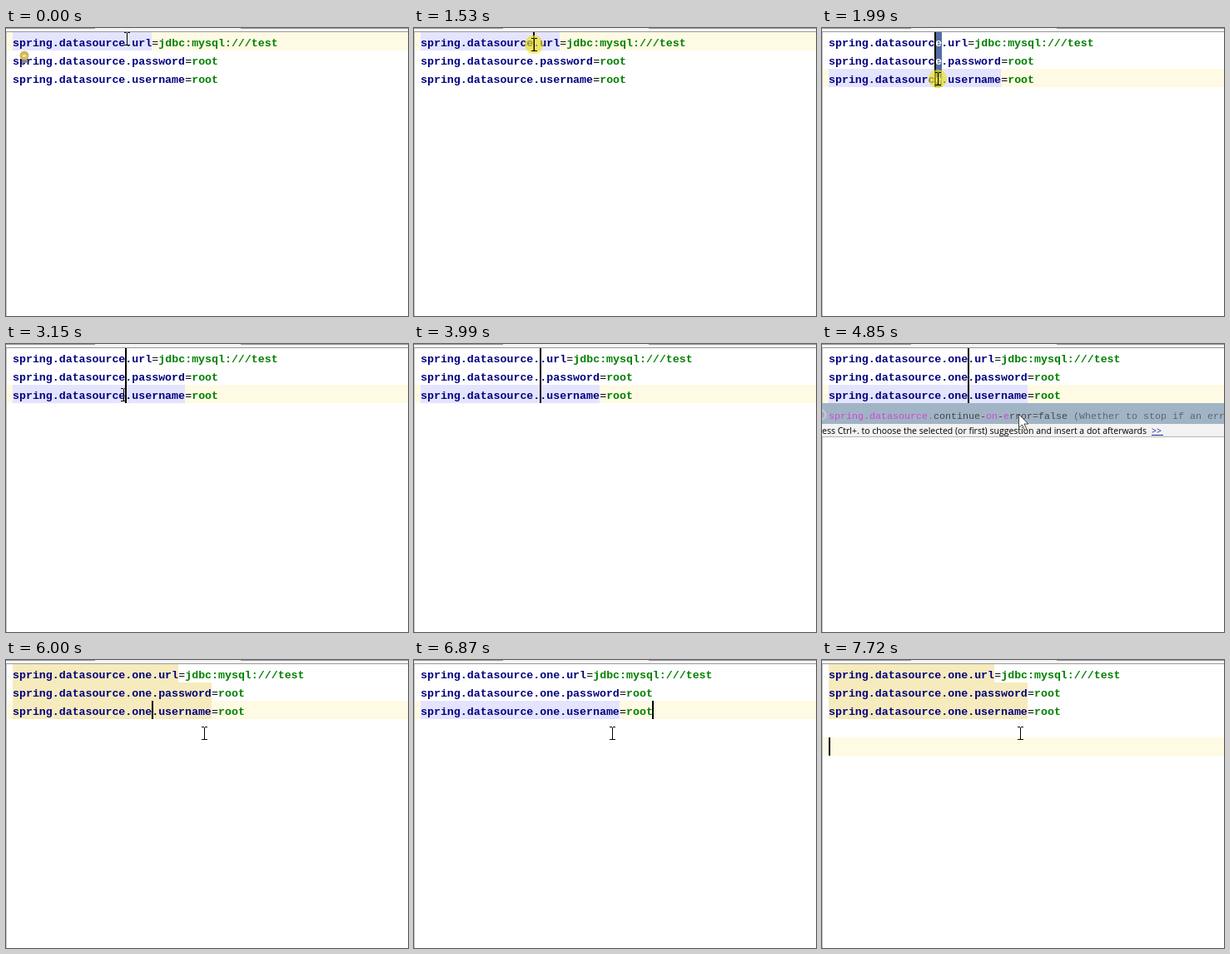
Write an HTML page with a canvas that moves like this. It is 483 px wide and 346 px high and loops after 8 s.

```html
<!DOCTYPE html>
<html>
<head>
<meta charset="utf-8">
<style>
html, body { margin: 0; width: 100%; height: 100%; overflow: hidden; background: #fff; }
canvas { display: block; }
</style>
</head>
<body>
<canvas id="stage" width="483" height="346"></canvas>
<script>
const ctx = document.getElementById('stage').getContext('2d');
const LOOP = 8000, W = 483, LEFT = 8, CELL = 7.97, LINE = 22, TOP = 5, POPUP_TOP = 71, ROW = 24;
const PLAIN_FONT = '13.28px "Liberation Mono", monospace';
const EDITOR_FONT = 'bold ' + PLAIN_FONT;
const POPUP_FONT = '11.667px "Liberation Mono", monospace';
const PREFIX = 'spring.datasource.';
const PROPERTIES = [['url', 'jdbc:mysql:///test'], ['password', 'root'], ['username', 'root']];
const SUGGESTIONS = [
  ['username', 'Login username of the database'],
  ['password', 'Login password of the database'],
  ['url', 'JDBC URL of the database'],
  ['driver-class-name', 'Fully qualified name of the JDBC driver'],
  ['type', 'Fully qualified name of the connection pool implementation'],
  ['schema', 'Schema (DDL) script resource references'],
  ['continue-on-error=false', 'Whether to stop if an error occurs'],
  ['data', 'Data (DML) script resource references'],
  ['data-password', 'Password of the database to execute DML scripts'],
  ['data-username', 'Username of the database to execute DML scripts'],
  ['generate-unique-name=false', 'Whether to generate a random name'],
  ['initialization-mode=embedded', 'Initialize the datasource'],
  ['platform=all', 'Platform to use in the scripts'],
  ['schema-password', 'Password of the database to execute DDL scripts'],
  ['separator=;', 'Statement separator in scripts'],
  ['hikari.connection-timeout', 'Connection timeout'],
  ['hikari.connection-test-query', 'Query used to test a connection'],
  ['tomcat.connection-properties', 'Properties of the connection'],
  ['dbcp2.connection-init-sqls', 'Statements run on connection'],
  ['xa.data-source-class-name', 'XA datasource fully qualified name']
];

const within = (t, a, b) => t >= a && t < b;
const clamp01 = v => Math.max(0, Math.min(1, v));
const columnX = col => LEFT + col * CELL;
const lineY = line => TOP + line * LINE;

function rect(x, y, w, h, color) {
  ctx.fillStyle = color;
  ctx.fillRect(x, y, w, h);
}

function disc(x, y, r, color) {
  ctx.fillStyle = color;
  ctx.beginPath();
  ctx.arc(x, y, r, 0, 7);
  ctx.fill();
}

function text(str, x, y, color) {
  ctx.fillStyle = color;
  ctx.fillText(str, x, y);
}

// Drag progress advances in seven hard steps.
const dragAt = t => t < 1530 ? 0 : clamp01((Math.floor((t - 1530) / 76.6) + 1) / 7);

function stateAt(t) {
  const drag = dragAt(t);
  const typed = t < 3920 ? '' : t < 4620 ? '.' : t < 4770 ? 'o.' : t < 4850 ? 'on.' : 'one.';
  const s = { typed, current: 0, first: 0, col: 17 + typed.length, select: 0, pressed: within(t, 1220, 3150) };
  s.mouse = { x: 145, y: 13, kind: 'beam' };

  if (t < 2690) {
    s.mouse.x = 145 - 6 * drag;
    s.mouse.y = 13 + 48 * drag;
    s.current = Math.min(2, Math.floor((s.mouse.y - TOP) / LINE));
    if (s.mouse.x < 140.5) { s.col = 16; s.select = 1; }
    s.caret = !(t < 210 || within(t, 760, 1220));
    return s;
  }

  s.current = 2;
  Object.assign(s.mouse, t < 2920 ? { x: 140, y: 61 } : t < 3300 ? { x: 141, y: 61 }
    : t < 3380 ? { x: 198, y: 77 } : { x: 238, y: 88 });
  if (within(t, 3920, 4460)) s.mouse.kind = 'none';
  if (within(t, 4460, 6000)) s.mouse.kind = 'arrow';
  s.caret = !(within(t, 3690, 3920) || within(t, 5690, 6000) || within(t, 6700, 6870));
  if (t >= 6000) s.first = 2;
  if (t >= 6870) s.col = 35;
  if (t >= 7490) {
    s.current = s.first = t < 7720 ? 3 : 4;
    s.col = 0;
  }
  return s;
}

function drawEditor(t, s) {
  rect(0, 0, W, 346, '#fff');
  rect(0, 0, W, 4, '#f4f4f4');
  rect(0, 0, 107, 1, '#999');
  rect(282, 0, W - 282, 1, '#999');
  rect(0, 4, W, 1, '#999');
  rect(0, TOP, 1, 341, '#c4c4c4');
  rect(1, lineY(s.current), W - 1, LINE, '#fffae3');

  PROPERTIES.forEach(([name, value], i) => {
    const key = PREFIX + s.typed + name;
    const y = lineY(i), keyWidth = Math.round(key.length * CELL);
    const warned = within(t, 6000, 6870) || t >= (i === 2 ? 7260 : 7170);
    if (warned) rect(LEFT, y, keyWidth, LINE, '#f6ebbc');
    else if (i === s.current) rect(LEFT, y, keyWidth, LINE, '#e4e4ff');
    ctx.font = PLAIN_FONT;
    text('=', columnX(key.length), y + 17, '#000');
    ctx.font = EDITOR_FONT;
    text(key, LEFT, y + 17, '#000080');
    text(value, columnX(key.length + 1), y + 17, '#008000');
    if (s.select && i <= s.current) {
      const x = Math.round(columnX(s.col));
      rect(x, y, 8 * s.select, LINE, '#526da5');
      text(key.substr(s.col, s.select), x, y + 17, '#fff');
    }
  });

  if (s.caret) {
    for (let i = s.first; i <= s.current; i++) {
      rect(Math.floor(columnX(s.col)), lineY(i), 2, LINE, '#000');
    }
  }
  if (t < 1220) {
    disc(22, 33, 5.5, '#d3b85c');
    rect(19, 38, 6, 4, '#8f8a78');
    rect(20, 32, 4, 3, '#f3e3a0');
  }
}

function matchedCells(name, query) {
  const at = name.indexOf(query === 'one' ? 'on-e' : query);
  return query === 'one' ? [at, at + 1, at + 3] : [...query].map((_, i) => at + i);
}

function drawPopup(s) {
  const query = s.typed.slice(0, -1);
  const done = query === 'one';
  const rows = SUGGESTIONS.filter(([name]) => name.includes(done ? 'on-e' : query));
  rect(0, POPUP_TOP, W, 275, done ? '#fff' : '#ebf4fe');
  if (done) rect(0, 111, 1, 235, '#c4c4c4');
  ctx.font = POPUP_FONT;
  rows.forEach(([name, description], i) => {
    const y = POPUP_TOP + 1 + i * ROW, base = y + 18, nameX = LEFT + PREFIX.length * 7;
    if (!i) rect(0, POPUP_TOP, W, 25, '#a0b4c6');
    disc(-1, y + 13, 6.5, i ? '#cbc5ea' : '#c5c9d8');
    disc(-1, y + 13, 4, '#a9a4c6');
    text(PREFIX, LEFT, base, '#d047d0');
    const marks = matchedCells(name, query);
    [...name].forEach((ch, n) => text(ch, nameX + n * 7, base, marks.includes(n) ? '#d047d0' : '#444'));
    text(`(${description})`, nameX + (name.length + 1) * 7, base, i ? '#b0b4ba' : '#5f666d');
  });
  if (!done) return;
  rect(0, 96, W, 15, '#f2f2f2');
  rect(0, 111, W, 1, '#b4b4b4');
  ctx.font = '10.5px "Open Sans", sans-serif';
  text('ess Ctrl+. to choose the selected (or first) suggestion and insert a dot afterwards', 0, 108, '#000');
  text('>>', 396, 108, '#1a2a9c');
  rect(396, 109, 14, 1, '#1a2a9c');
}

function drawMouse({ x, y, kind }, pressed) {
  if (pressed) disc(x, y, 11, 'rgba(236, 226, 20, .65)');
  if (kind === 'beam') {
    x = Math.round(x);
    y = Math.round(y);
    rect(x, y - 7, 1, 15, '#000');
    for (const edge of [y - 8, y + 7]) {
      rect(x - 3, edge, 3, 1, '#000');
      rect(x + 1, edge, 3, 1, '#000');
    }
  } else if (kind === 'arrow') {
    ctx.save();
    ctx.translate(236.5, 84.5);
    const arrow = new Path2D('M0 0V16L4 12.5L7 19L9.5 18L6.5 11.5H11.5Z');
    ctx.fillStyle = '#fff';
    ctx.fill(arrow);
    ctx.strokeStyle = '#444';
    ctx.stroke(arrow);
    ctx.restore();
  }
}

function frame(now) {
  const t = now % LOOP, s = stateAt(t);
  drawEditor(t, s);
  if (within(t, 4460, 6000)) drawPopup(s);
  drawMouse(s.mouse, s.pressed);
  requestAnimationFrame(frame);
}
requestAnimationFrame(frame);
</script>
</body>
</html>
```
